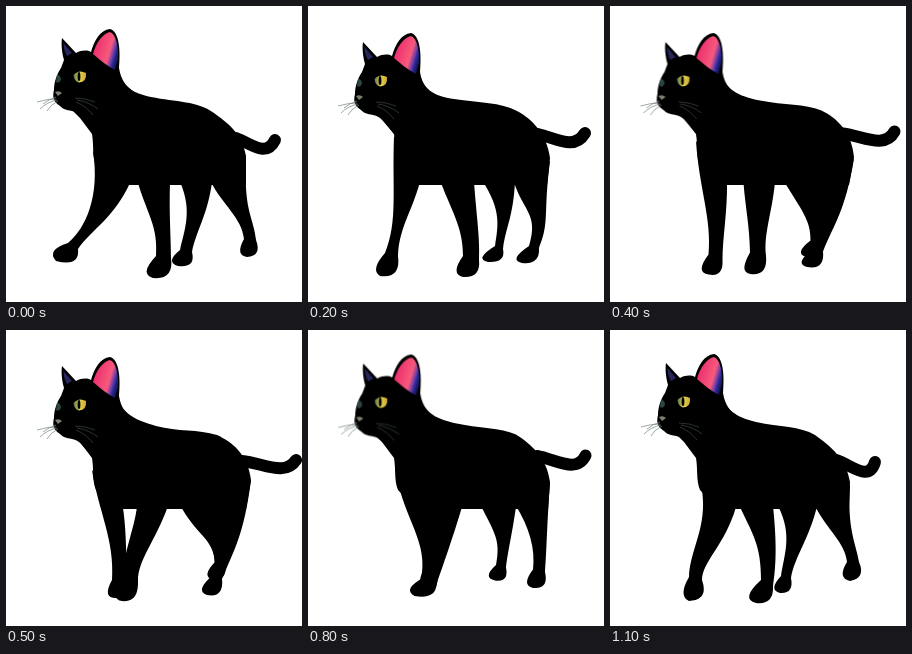
An HTML page without scripts that plays this animation: 296 by 296 pixels, repeating every 1.2 s.

```html
<!DOCTYPE html>
<html lang="en">
<head>
<meta charset="utf-8">
<title>Walking cat</title>
<style>
html, body { margin: 0; height: 100%; overflow: hidden; background: #fff; }
svg { display: block; width: 100vw; height: 100vh; }

/* each pose pair holds one in-between, 100 ms per step */
.move { animation: 1.2s steps(2) infinite; }
.head { animation-name: head; }
.back { animation-name: back; }
.fore-a { animation-name: fore-a; }
.fore-b { animation-name: fore-b; }
.hind-a { animation-name: hind-a; }
.hind-b { animation-name: hind-b; }
.tail { animation-name: tail; fill: none; stroke: #000; stroke-width: 12; stroke-linecap: round; }
.whisker { fill: none; stroke: #71827f; stroke-width: .7; }

@keyframes head {
  0%, 100% { transform: translate(1px, -4px); }
  16.66% { transform: translate(0, 0); animation-timing-function: steps(1); }
  25% { transform: translate(0, 0); }
  41.66% { transform: translate(1px, 0); }
  58.33% { transform: translate(1px, -3px); }
  75% { transform: translate(-.5px, -2px); }
  91.66% { transform: translate(1px, -3px); animation-timing-function: steps(1); }
}
@keyframes back {
  0%, 100% { d: path("M110 60C114 80 126 87 145 91C170 96 192 95 208 107C220 116 236 126 240 150L240 179L110 179Z"); }
  16.66% { d: path("M110 62C114 84 126 90 146 93C172 97 192 96 209 105C224 113 239 128 242 152L239 179L110 179Z"); animation-timing-function: steps(1); }
  25% { d: path("M110 62C114 84 126 90 150 93C178 97 196 96 212 104C227 112 241 126 243 152L238 179L110 179Z"); }
  41.66% { d: path("M110 62C114 84 130 90 150 96C172 102 192 99 211 105C226 112 242 124 245 150L240 179L110 179Z"); }
  58.33% { d: path("M110 60C114 82 126 88 146 94C172 100 192 98 208 106C222 115 239 128 242 152L240 179L110 179Z"); }
  75% { d: path("M110 60C114 82 126 88 146 92C172 97 192 97 208 103C222 112 239 126 242 152L240 179L110 179Z"); }
  91.66% { d: path("M110 60C114 80 126 87 146 92C170 97 190 96 205 105C219 115 236 128 240 152L239 179L110 179Z"); animation-timing-function: steps(1); }
}
@keyframes tail {
  0%, 100% { d: path("M230 132C246 138 260 152 269 134"); }
  16.66% { d: path("M230 128C248 132 266 145 277 127"); animation-timing-function: steps(1); }
  25% { d: path("M230 124C249 127 270 140 279 121"); }
  41.66% { d: path("M236 131C257 133 279 147 290 130"); }
  58.33% { d: path("M230 128C249 132 271 147 280 130"); }
  75% { d: path("M228 124C247 127 266 141 275 121"); }
  91.66% { d: path("M226 130C243 136 259 152 265 132"); animation-timing-function: steps(1); }
}
@keyframes fore-a {
  0%, 100% { d: path("M87 145C94 190 80 222 62 237Q40 244 50 255Q74 261 72 243C86 223 108 212 124 177Z"); }
  16.66% { d: path("M86 130C84 185 90 215 77 247Q62 264 72 270Q93 273 90 250C91 222 103 208 112 176Z"); animation-timing-function: steps(1); }
  25% { d: path("M86 130C86 185 95 215 91 247Q74 265 87 269Q105 273 104 256C105 230 114 205 117 176Z"); }
  41.66% { d: path("M86 140C92 180 109 210 106 250Q96 268 110 268Q122 270 121 252C120 235 121 205 117 178Z"); }
  58.33% { d: path("M87 140C93 185 115 210 105 245Q99 266 112 266Q128 266 125 245C126 222 133 212 147 178Z"); }
  75% { d: path("M87 130C91 180 122 205 123 240Q116 258 124 259Q136 260 133 238C131 215 131 200 126 175Z"); }
  91.66% { d: path("M87 140C104 190 80 215 79 247Q68 266 79 271Q99 270 92 250C92 232 115 215 126 177Z"); animation-timing-function: steps(1); }
}
@keyframes fore-b {
  0%, 100% { d: path("M132 177C142 210 152 220 150 250Q133 268 147 272Q168 274 165 252C165 230 163 210 164 176Z"); }
  16.66% { d: path("M133 177C145 208 155 222 155 250Q142 268 155 271Q173 272 171 254C172 232 169 215 166 176Z"); animation-timing-function: steps(1); }
  25% { d: path("M136 177C143 205 161 218 164 243Q153 263 165 265Q183 267 180 249C175 225 174 205 168 176Z"); }
  41.66% { d: path("M131 177C128 200 118 220 116 250Q104 270 116 271Q133 273 132 250C132 230 150 210 162 176Z"); }
  58.33% { d: path("M96 176C106 205 114 222 95 242Q75 249 85 258Q108 262 110 246C120 228 132 208 150 178Z"); }
  75% { d: path("M127 175C134 195 138 225 136 253Q113 270 128 274Q148 277 147 262C151 240 156 212 158 176Z"); }
  91.66% { d: path("M130 177C143 205 151 215 151 250Q130 269 146 273Q164 275 163 256C166 235 167 215 163 176Z"); animation-timing-function: steps(1); }
}
@keyframes hind-a {
  0%, 100% { d: path("M174 176C187 205 178 225 174 244Q159 256 172 260Q190 262 186 246C190 225 202 208 206 176Z"); }
  16.66% { d: path("M174 174C194 205 190 220 187 240Q166 253 180 256Q198 257 195 243C198 220 205 212 207 176Z"); animation-timing-function: steps(1); }
  25% { d: path("M173 174C192 202 195 220 192 237Q172 249 186 252Q202 252 201 240C205 225 208 205 208 176Z"); }
  41.66% { d: path("M174 175C190 205 207 208 209 232Q195 246 207 250Q220 252 220 235C222 215 222 200 215 176Z"); }
  58.33% { d: path("M174 176C186 203 207 200 208 232Q200 249 212 249Q222 250 217 235C216 215 212 200 207 177Z"); }
  75% { d: path("M172 176C187 203 179 220 168 238Q148 246 162 252Q180 255 179 240C184 226 196 210 209 176Z"); }
  91.66% { d: path("M168 176C183 205 174 225 171 246Q158 260 170 263Q184 264 181 248C184 228 200 207 207 176Z"); animation-timing-function: steps(1); }
}
@keyframes hind-b {
  0%, 100% { d: path("M205 176C216 198 236 212 238 233Q229 249 241 251Q256 250 250 234C248 213 238 205 240 160Z"); }
  16.66% { d: path("M206 176C215 205 231 208 221 240Q200 254 214 257Q232 259 231 242C242 215 235 210 242 155Z"); animation-timing-function: steps(1); }
  25% { d: path("M206 174C210 205 204 222 200 240Q179 254 193 257Q212 260 210 242C220 215 232 208 243 155Z"); }
  41.66% { d: path("M185 176C205 205 211 225 208 244Q188 261 201 265Q218 268 216 249C228 220 238 205 245 150Z"); }
  58.33% { d: path("M207 176C223 198 222 225 219 243Q205 259 217 262Q234 265 231 246C236 215 239 205 242 152Z"); }
  75% { d: path("M208 174C220 198 233 212 231 236Q221 251 233 254Q248 254 243 238C242 215 238 200 242 152Z"); }
  91.66% { d: path("M205 176C217 200 235 212 237 232Q227 248 240 251Q256 248 249 232C246 213 237 200 240 155Z"); animation-timing-function: steps(1); }
}
</style>
</head>
<body>
<svg viewBox="0 0 296 296">
  <defs>
    <linearGradient id="ear" x1=".1" y1=".35" x2="1" y2=".75">
      <stop offset="0" stop-color="#ee2f6e"/>
      <stop offset=".58" stop-color="#f65a7c"/>
      <stop offset=".72" stop-color="#8440a4"/>
      <stop offset=".82" stop-color="#2c2c9c"/>
      <stop offset="1" stop-color="#0c0c3a"/>
    </linearGradient>
    <linearGradient id="iris" x2="1">
      <stop offset="0" stop-color="#5f7350"/>
      <stop offset=".5" stop-color="#e0d24c"/>
      <stop offset="1" stop-color="#d0a830"/>
    </linearGradient>
  </defs>

  <path class="move tail"/>
  <path class="move hind-a"/>
  <path class="move hind-b"/>
  <path class="move fore-a"/>
  <path class="move fore-b"/>
  <path class="move back"/>
  <path d="M64 102L74 112L86 128C88 140 86 150 90 160L108 179L207 179L150 110L112 80Z"/>

  <g class="move head">
    <path d="M57 58C55 51 54 42 55 36L69 51C75 48 80 48 84 50C87 39 93 28 103 27C111 29 114 44 112 66C114 78 119 84 126 89L110 130L86 128L75 115Q71 110 65 109C59 108 56 107 53 104C47 100 45 96 47 88C47 80 50 72 54 66Z"/>
    <path fill="url(#ear)" d="M86 52C89 41 95 32 103 30C109 32 112 45 111 58L108 68C100 64 92 57 86 52Z"/>
    <path fill="#25265c" d="M56.500 41C56.500 46 58 51 60 54L65 51Z"/>
    <path fill="url(#iris)" d="M66.500 73Q72 67 79 71Q80 80 72 80.500Q67 79 66.500 73Z"/>
    <ellipse cx="72" cy="74.500" rx="1.400" ry="4.600"/>
    <path fill="#2c4542" d="M50 73Q54 73 54 78Q52 82 49 80Z"/>
    <path fill="#7c8070" d="M48 90Q52 88 55 91L51 94Z"/>
    <path class="whisker" d="M49 97Q40 97 30 100M50 98Q40 100 33 107M51 99Q43 103 40 109M49 95Q42 97 36 102"/>
    <path class="whisker" stroke-opacity=".55" d="M70 98Q82 100 91 107M69 100Q79 104 86 113M68 96Q78 96 88 100"/>
  </g>
</svg>
</body>
</html>
```
